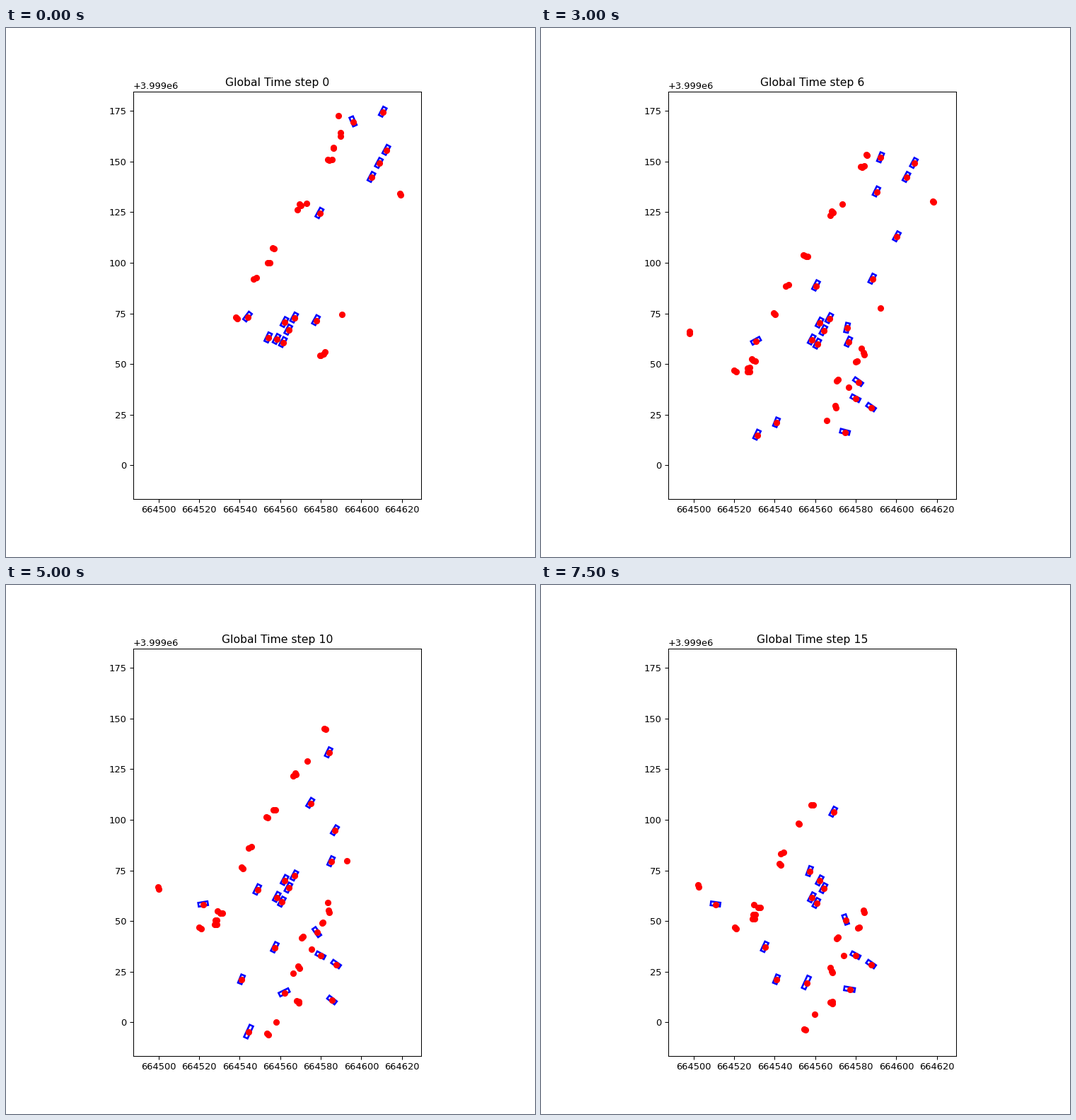
A matplotlib script for the animation above (8000 ms loop, 748 px wide and 748 px high).

```python
import numpy as np
import matplotlib.pyplot as plt
from matplotlib.animation import FuncAnimation
from matplotlib.patches import Polygon

STEPS = 16
DPI = 93.5                         # 8 inches make 748 pixels
SCALE = 2.866                      # pixels per metre
X0, X1 = 664487.4, 664629.5
Y0, Y1 = 3998983.52, 3999184.48
LEFT, TOP = 180.0, 89.76           # plot corner in pixels
LANE = 62                          # heading of the main road in degrees

cars, walkers = [], []


def to_map(x, y):
    return X0 + (x - LEFT) / SCALE, Y1 - (y - TOP) / SCALE


def drive(first, last, *pts, heading=None, length=13.4, width=5.5):
    """Smooth run through evenly timed points; the car faces along its path."""
    t = np.linspace(first, last, len(pts))
    x, y = (np.poly1d(np.polyfit(t, c, len(pts) - 1)) for c in np.transpose(pts))

    def pose(step):
        a = np.arctan2(-y.deriv()(step), x.deriv()(step)) if heading is None else np.radians(heading)
        return x(step), y(step), a

    cars.append((first, last, pose, (length, width)))


def park(first, last, x, y, heading=LANE, **size):
    drive(first, last, (x, y), heading=heading, **size)


def walk(first, last, velocity, *starts):
    """People sharing a constant velocity in pixels per step."""
    for start in starts:
        walkers.append((first, last, np.array(start), np.array(velocity)))


# waiting cars, the first group creeping forward
for x, y, last in (394, 415.7, 15), (407.7, 409.3, 14), (399.4, 426.5, 15), (382.9, 439.6, 15):
    drive(0, last, (x, y), (x + 0.3, y + 2), heading=LANE)
drive(0, 15, (391.8, 444), (389.6, 449.5), heading=LANE)
for x, y, last in (533, 118.3, 1), (538, 172.3, 5), (527.5, 190.7, 6), (517, 210.5, 8):
    park(0, last, x, y)
park(5, 15, 333.2, 557.5, 68, length=12.7)
park(3, 15, 445, 523.5, -28)
park(3, 15, 467, 536, -35)

# down the road
drive(0, 15, (491, 132), (483, 212.7), (430.5, 308), (380, 404.5))
drive(2, 15, (495, 141), (466.5, 215), (413.5, 320.5))
drive(0, 15, (443.5, 261.5), (376.3, 389), (316.5, 511.5), length=14)
drive(0, 6, (371, 437.5), (305.6, 575))
drive(0, 15, (341.8, 408), (310.5, 438.5), (279, 451), (247, 451))

# up the road
drive(0, 8, (438.5, 413), (525, 255))
drive(2, 9, (422.5, 447), (503, 285))
drive(3, 11, (428, 482), (438.3, 404.5), (478, 327.5))
drive(6, 12, (435, 443.5), (472.3, 364))
drive(7, 14, (346.7, 580.5), (425.2, 421), length=14)
drive(10, 15, (343.3, 631.5), (375.5, 562), length=19)

# turning
drive(7, 15, (375, 591), (401, 573), (436.5, 571.5), length=15)
drive(6, 15, (448.7, 500), (438.8, 489.3), (431, 473), length=14)
drive(6, 13, (430, 571), (457.5, 584), (482, 608))

# top crossings
walk(0, 5, (0.87, 0), (470.5, 124))
walk(0, 5, (0.25, -1.62), (473.5, 147.5), (473.5, 152.7))
walk(0, 8, (-0.45, 1.7), (462.8, 169.2), (463.5, 170))
walk(0, 10, (-0.5, 1.68), (455, 186.3), (457.2, 187))
walk(0, 8, (-0.72, 1.6), (461.5, 185.5))
walk(0, 7, (-0.4, 1.8), (557, 234))
walk(0, 6, (-0.5, 1.65), (558.5, 236))
walk(0, 13, (-0.6, 1.75), (415.3, 248.5))
walk(0, 12, (-0.68, 1.7), (417.5, 250.5))
walk(0, 12, (-0.6, 1.3), (412.5, 257))
walk(0, 10, (0.1, 0.1), (425.2, 248.2))

# left pavement
walk(0, 15, (-0.88, 1.74), (377, 311), (378.8, 312))
walk(0, 15, (0.8, -1.37), (370.5, 331.5), (372.9, 331.5))
walk(0, 15, (-0.73, 1.65), (350.7, 355), (354.5, 353.4))
walk(0, 15, (0.78, -1.0), (325.1, 409), (327.1, 411))

# right pavement
walk(0, 10, (0.72, -1.5), (475.5, 404.5))
walk(0, 15, (0.3, 1.43), (443.9, 463.3), (445.6, 462.7))
walk(0, 5, (0.5, -1.25), (449, 461))
walk(0, 12, (0.4, -0.85), (451, 457.7))
walk(3, 15, (0, 0.1), (456, 459.1))
walk(5, 15, (0, 0.1), (457, 462))
walk(6, 15, (0, 0.1), (418.4, 499), (420, 496.7))
walk(6, 15, (-0.8, 1.8), (435.6, 508))
walk(6, 15, (-0.58, 1.24), (416, 534.4), (417.7, 537))
walk(6, 15, (0.62, -1.5), (403.9, 554.5))

# bottom crossing
walk(7, 15, (-0.38, 0.27), (412.8, 587.5), (415.5, 589.7))
walk(8, 15, (-0.4, 0.15), (414.8, 588.3))
walk(9, 15, (1.08, -2.08), (381, 619.6))
walk(9, 15, (0.6, -1.33), (368.7, 635.7), (371, 637))

# far left
walk(5, 15, (1.37, -0.55), (208.5, 429.7), (209.2, 432.3))
walk(4, 15, (0.2, 0), (272.4, 483.7))
walk(5, 15, (0.05, 0), (275.8, 485.7))
walk(2, 15, (0.35, -1.78), (296.5, 475))
walk(2, 15, (0.77, -1.57), (297.5, 476.4))
walk(3, 15, (0.75, -1.65), (301.2, 476))
walk(3, 15, (0.85, -1.63), (290, 485.8), (292.6, 485.2))
walk(3, 15, (0.78, -1.48), (289.7, 490.2), (292.5, 490))

fig, ax = plt.subplots(figsize=(8, 8), dpi=DPI)
ax.set_aspect("equal")
ax.set_xlim(X0, X1)
ax.set_ylim(Y0, Y1)
title = ax.set_title("Global Time step 0")
boxes = [ax.add_patch(Polygon(np.zeros((4, 2)), fill=False, ec="blue", lw=2)) for _ in cars]
dots, = ax.plot([], [], "ro")


def outline(x, y, a, size):
    along = np.array([np.cos(a), -np.sin(a)]) * size[0] / 2
    side = np.array([np.sin(a), np.cos(a)]) * size[1] / 2
    signs = ((1, 1), (1, -1), (-1, -1), (-1, 1))
    return [to_map(*((x, y) + i * along + j * side)) for i, j in signs]


def update(step):
    title.set_text(f"Global Time step {step}")
    pts = [p + v * (step - first) for first, last, p, v in walkers if first <= step <= last]
    for (first, last, pose, size), box in zip(cars, boxes):
        shown = first <= step <= last
        box.set_visible(shown)
        if shown:
            x, y, a = pose(step)
            box.set_xy(outline(x, y, a, size))
            pts.append((x + 0.4, y + 0.6))
    dots.set_data(*to_map(*np.array(pts).T))
    return [title, dots, *boxes]


anim = FuncAnimation(fig, update, frames=STEPS, interval=500, repeat=True, repeat_delay=0)
plt.show()
```
